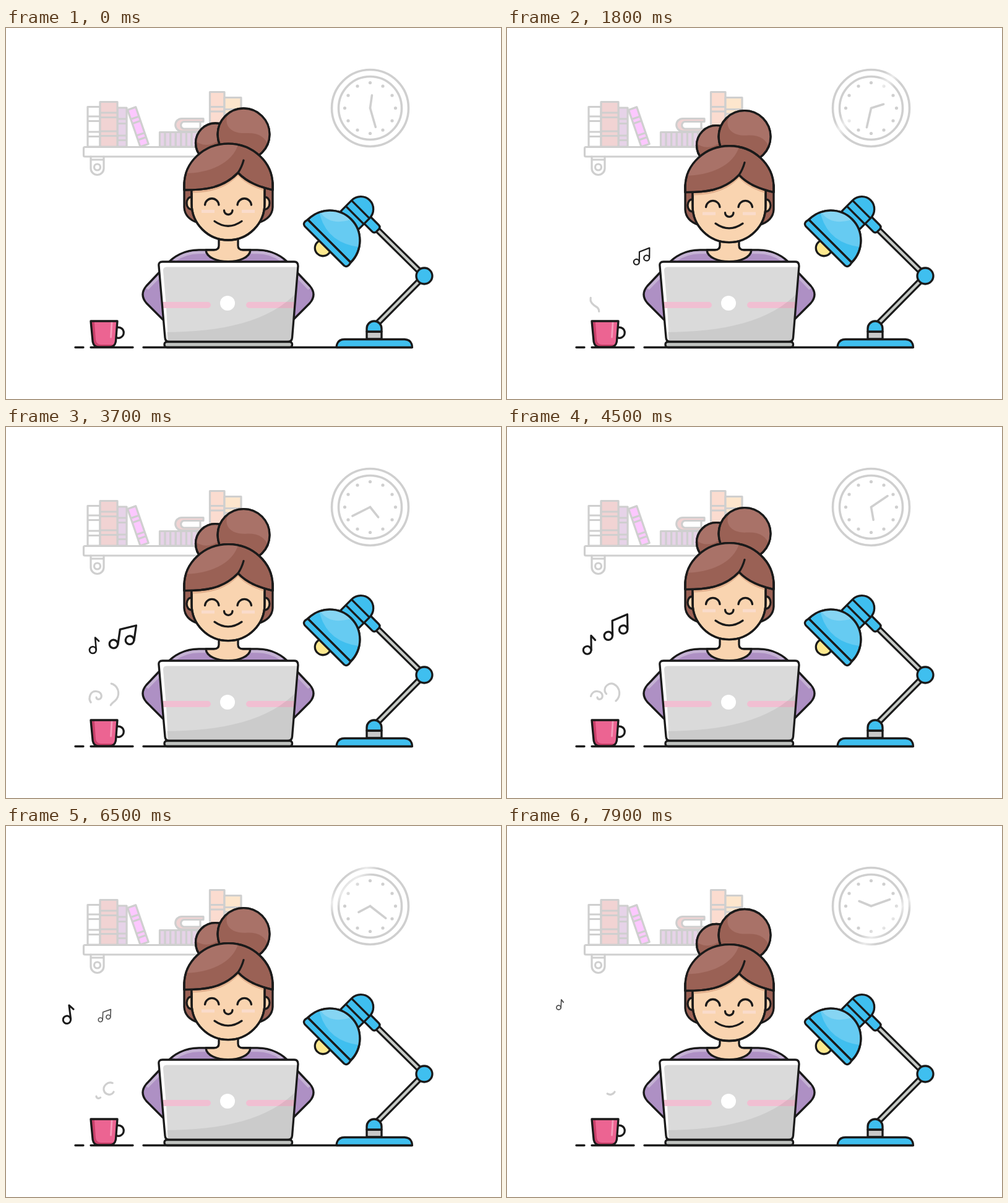
Animation, 800 px wide and 600 px high, one loop 8000 ms. Source, as an HTML page:

```html
<!DOCTYPE html>
<html lang="en">
<head>
<meta charset="utf-8">
<title>Working at a desk</title>
<style>
html, body { margin: 0; width: 100%; height: 100%; overflow: hidden; background: #fff; }
svg { display: block; width: 800px; height: 600px; }
.ink { stroke: #1a1a1a; stroke-width: 3.3; }
.pale { stroke: #cfcfcf; stroke-width: 3.2; }
</style>
</head>
<body>
<svg viewBox="0 0 800 600" fill="none" stroke-linecap="round" stroke-linejoin="round">
<defs>
  <path id="lid" d="M253 378H466Q472 378 472 385L462.500 501Q462 507.500 455 507.500H264Q257.500 507.500 257 501L247 385Q246 378 253 378Z"/>
  <path id="dome" d="M-49 -9A49 50 0 0 1 49 -9Z"/>
  <path id="fringe" d="M288 262V254A71.500 67 0 0 1 431 254V262C410 257 390 250 375 234C350 260 320 262 288 262Z"/>
  <path id="face" d="M300 220V284A59 59 0 0 0 418 284V220"/>
  <path id="cup" d="M137 474H180L177.500 506Q176.500 516 167 516H150Q141 516 140 506Z"/>
  <path id="arm" d="M598 324L676 401L599 479"/>
  <circle id="bun" cx="384" cy="172" r="42"/>
  <circle id="knot" cx="338.500" cy="186" r="32"/>
  <clipPath id="inLid"><use href="#lid"/></clipPath>
  <clipPath id="inDome"><use href="#dome"/></clipPath>
  <clipPath id="inFringe"><use href="#fringe"/></clipPath>
  <clipPath id="inFace"><use href="#face"/></clipPath>
  <clipPath id="inCup"><use href="#cup"/></clipPath>
  <clipPath id="inBun"><use href="#bun"/></clipPath>
  <clipPath id="inKnot"><use href="#knot"/></clipPath>
  <clipPath id="inClock"><circle r="65"/></clipPath>
  <linearGradient id="glow">
    <stop offset="0" stop-color="#fff" stop-opacity="0"/>
    <stop offset=".5" stop-color="#fff" stop-opacity=".6"/>
    <stop offset="1" stop-color="#fff" stop-opacity="0"/>
  </linearGradient>
</defs>

<g class="pale">
  <rect x="125.500" y="192.500" width="230" height="15.500" rx="2"/>
  <path d="M137 208V227A10.500 10.500 0 0 0 158 227V208M137 213H158"/>
  <circle cx="147.500" cy="225" r="5"/>
  <g id="books"></g>
  <path fill="#f1d3d3" d="M319 146.500H284A10 10 0 0 0 284 167H319V163H287A6 6 0 0 1 287 151.500H319ZM314 152V163"/>
</g>

<!-- clock -->
<g transform="translate(588.500 129.500)">
  <g class="pale">
    <g stroke-width="3.600">
      <circle r="62"/><circle r="51"/>
      <path id="hour" d="M0 0V-21"/>
      <path id="minute" d="M0 0V-32"/>
    </g>
    <g id="dots" fill="#cfcfcf" stroke="none"></g>
  </g>
  <g clip-path="url(#inClock)"><rect id="sheen" x="-14" y="-70" width="28" height="140" fill="url(#glow)"/></g>
</g>

<!-- body -->
<g class="ink">
  <path fill="#ae90c4" d="M312 359H406C430 359 448 370 458 382L491 417Q503 431 491 445L461 475H257L227 445Q215 431 227 417L260 382C270 370 288 359 312 359Z"/>
  <path class="twin" stroke="#c5b2d4" stroke-width="4.500" stroke-linecap="butt" d="M228 422L264 385M272 376C284 367 298 363 312 363H322" style="stroke:#c5b2d4;stroke-width:4.500"/>
  <path fill="#f9d4b0" d="M344 330V352Q344 359 336 359H323C325 384 393 384 395 359H383Q375 359 375 352V330"/>
</g>

<!-- head -->
<g id="head" class="ink">
  <path fill="#9a6155" d="M288 250V290Q289 308 310 315H408Q430 308 431 290V250Z"/>
  <path class="twin" fill="#f9d4b0" d="M301 273.500C289 272 289 294 301 293.500"/>
  <use href="#face" fill="#f9d4b0"/>
  <g clip-path="url(#inFace)"><use href="#fringe" y="5" fill="#e2b08d" stroke="none"/></g>
  <use href="#face"/>
  <path class="twin" fill="#fadccb" stroke="none" style="stroke:none" d="M316 294H337V299H316Z"/>
  <path class="twin" d="M321.500 286A11.300 11.300 0 0 1 344 286"/>
  <path d="M352.500 295A6.700 6.700 0 0 0 366 295M337 312.500Q359 328 381 312.500"/>
  <use href="#knot" fill="#9a6155"/>
  <circle clip-path="url(#inKnot)" cx="324" cy="160" r="29" fill="#a97268" stroke="none"/>
  <use href="#knot"/>
  <use href="#bun" fill="#9a6155"/>
  <path clip-path="url(#inBun)" stroke="none" fill="#a97268" d="M372 125C345 145 355 172 388 170C408 169 420 176 424 192L440 170V120Z"/>
  <use href="#bun"/>
  <use href="#fringe" fill="#9a6155"/>
  <path clip-path="url(#inFringe)" stroke="none" fill="#a97268" d="M286 235C325 236 368 220 376 185H286Z"/>
  <use href="#fringe"/>
  <path d="M375 234Q381 225 384 214"/>
</g>

<!-- laptop -->
<use href="#lid" fill="#fff"/>
<g clip-path="url(#inLid)">
  <use href="#lid" x="7" y="8.500" fill="#dadada"/>
  <path fill="#dadada" d="M258 430H475V510H262Z"/>
  <path stroke="#f1bfd2" stroke-width="10" d="M246 448H326M393 448H475"/>
  <path fill="#000" fill-opacity=".07" d="M475 422C430 475 350 492 250 492V510H475Z"/>
  <circle cx="358" cy="445" r="12" fill="#fff"/>
</g>
<g class="ink">
  <use href="#lid"/>
  <rect x="256" y="507.500" width="206.500" height="9" rx="4" fill="#c0c3c0"/>
  <path d="M112 516.500H125M137 516.500H205M222 516.500H656"/>
</g>

<!-- cup -->
<path class="ink" d="M179 484.500A8.600 8.600 0 1 1 178 500.500"/>
<use href="#cup" fill="#c9406a"/>
<g clip-path="url(#inCup)">
  <path fill="#ec6492" d="M142.500 470H185L180 506Q178 512 172 512H154Q146 512 145 504Z"/>
  <path stroke="#f59cba" stroke-width="2.800" d="M171 476L169.500 500"/>
</g>
<use href="#cup" class="ink"/>
<g class="pale" id="steam">
  <path pathLength="1" d="M148 462Q150 456 146 452C139 448 134 444 135 438C136 430 141 427 146 427.500C152 428 155 432 154 437C152 442 146 441 146 437"/>
  <path pathLength="1" d="M168 458C167 450 171 447 176 443C184 436 184 422 173 416C165 412 157 420 158 427C160 435 170 437 174 430"/>
</g>

<!-- lamp -->
<g class="ink">
  <use href="#arm" stroke-width="10.500"/>
  <use href="#arm" stroke="#c6cac6" stroke-width="4.200"/>
  <circle cx="676" cy="401" r="13" fill="#3fbfef"/>
  <path fill="#c8c8c8" d="M583 491H607V503H583Z"/>
  <path fill="#3fbfef" d="M583 491V486A12 12 0 0 1 607 486V491ZM534 516.500Q535 503.500 547 503.500H644Q656 504 656.500 516.500Z"/>
  <g transform="translate(516 351) rotate(45)">
    <circle cx=".7" cy="6" r="13" fill="#fde98f"/>
    <path fill="#3fbfef" d="M19 -84H38Q43 -84 43 -79V-74Q43 -69 38 -69H19Z"/>
    <path fill="#3fbfef" d="M-21 -56V-81A20.500 21 0 0 1 20 -81V-56ZM-21 -68H20M-21 -81H20"/>
    <use href="#dome" fill="#3fbfef"/>
    <g clip-path="url(#inDome)" stroke="none">
      <path fill="#66cbf2" d="M-48 -33Q0 0 48 -42V-62H-48Z"/>
      <path fill="#86d5f3" d="M-48 -33Q-16 -24 2 -62H-48Z"/>
    </g>
    <use href="#dome"/>
    <path fill="#3fbfef" d="M-49 -9H49Q52 1 45 2H-45Q-52 1 -49 -9Z"/>
  </g>
</g>

<!-- music -->
<g class="ink" id="pair">
  <circle cx="-16" cy="17.500" r="6.800"/><circle cx="9" cy="7.500" r="6.800"/>
  <path d="M-9 17V-7.500L16 -17.500V7"/>
</g>
<g class="ink" id="single">
  <circle cx="-6" cy="13" r="6.800"/>
  <path d="M1 13V-12L8 -4"/>
</g>
</svg>
<script>
const { sin, cos, PI, min, max } = Math;
const $ = id => document.getElementById(id);
const set = (el, name, value) => el.setAttribute(name, value);
const ramp = (t, from, to) => min(1, max(0, (t - from) / (to - from)));
const smooth = (t, from, to) => { const u = ramp(t, from, to); return u * u * (3 - 2 * u); };
const mix = (a, b, u) => a + (b - a) * u;

function add(parent, tag, attrs) {
  const el = document.createElementNS("http://www.w3.org/2000/svg", tag);
  for (const name in attrs) set(el, name, attrs[name]);
  parent.append(el);
  return el;
}

// A standing book with a pair of stripes at each given height.
function book(x, top, width, fill, stripes, tilt = 0) {
  const lines = stripes.map(y => `M${x} ${y}h${width}m0 7.5h${-width}`).join("");
  add($("books"), "path", {
    fill, d: `M${x} ${top}h${width}V192h${-width}Z${lines}`, transform: `rotate(${tilt} ${x} 192)`
  });
}
book(132, 127.5, 20, "none", [143, 168]);
book(180, 129, 15, "#e6d3e8", [147, 174]);
book(152, 119.5, 28, "#f1d3d3", [137, 167]);
book(217, 129, 14, "#fcc8ff", [145, 173], -19);
book(329.5, 103.5, 23.5, "#fbdcd0", [127.5]);
book(353, 112.5, 27, "#fde6cd", [131.5]);
for (let x = 248.5; x < 310; x += 8.6) add($("books"), "rect", { x, y: 168.5, width: 8.6, height: 23.5, fill: "#e6d3e8" });

for (let i = 0; i < 12; i++) {
  add($("dots"), "circle", { r: 2.6, cx: 41 * sin(i * PI / 6), cy: 41 * cos(i * PI / 6) });
}

// Paired parts are drawn once and mirrored about the body's axis.
for (const part of document.querySelectorAll(".twin")) {
  const copy = part.cloneNode();
  set(copy, "transform", "translate(718 0) scale(-1 1)");
  part.after(copy);
}

// A note swells, sways and shrinks again during its life.
function note(id, t, birth, swayPeak, x, y) {
  const life = sin(PI * ramp(t, birth, birth + 6.4));
  const size = max(0, life) ** .6;
  const angle = 8.5 * life * cos(2 * PI * (t - swayPeak) / 2.6);
  set($(id), "transform", `translate(${x} ${y}) rotate(${angle}) scale(${size})`);
  set($(id), "opacity", min(1, 1.5 * size));
}

// A line of steam is drawn from its foot, then vanishes from its foot.
function puff(path, t) {
  const from = ramp(t, 1, 7) ** 1.5, to = ramp(t, .5, 3.5);
  set(path, "stroke-dasharray", `${to - from} 9`);
  set(path, "stroke-dashoffset", -from);
  set(path, "visibility", to > from ? "visible" : "hidden");
}

function draw(t) {
  set($("head"), "transform", `translate(0 ${2.3 * (1 - cos(2 * PI * t / 5.1))})`);
  set($("hour"), "transform", `rotate(${8 + 36 * t})`);
  set($("minute"), "transform", `rotate(${164 + 216 * t})`);
  set($("sheen"), "transform", `rotate(45) translate(${60 * (t % 5.3 - 2)})`);
  note("pair", t, .75, 3.8, mix(225, 161, smooth(t, .8, 6.5)), mix(369, 305, smooth(t, 1.3, 6)));
  note("single", t, 2.2, 5.2, mix(147, 86, smooth(t, 3, 8.3)), mix(350, 287, smooth(t, 4.2, 7.5)));
  [...$("steam").children].forEach((path, i) => puff(path, t - 1.5 * i));
}

// The motion advances in steps of a tenth of a second.
function tick(now) {
  draw(Math.floor(now % 8000 / 100) / 10);
  requestAnimationFrame(tick);
}
draw(0);
requestAnimationFrame(tick);
</script>
</body>
</html>
```
